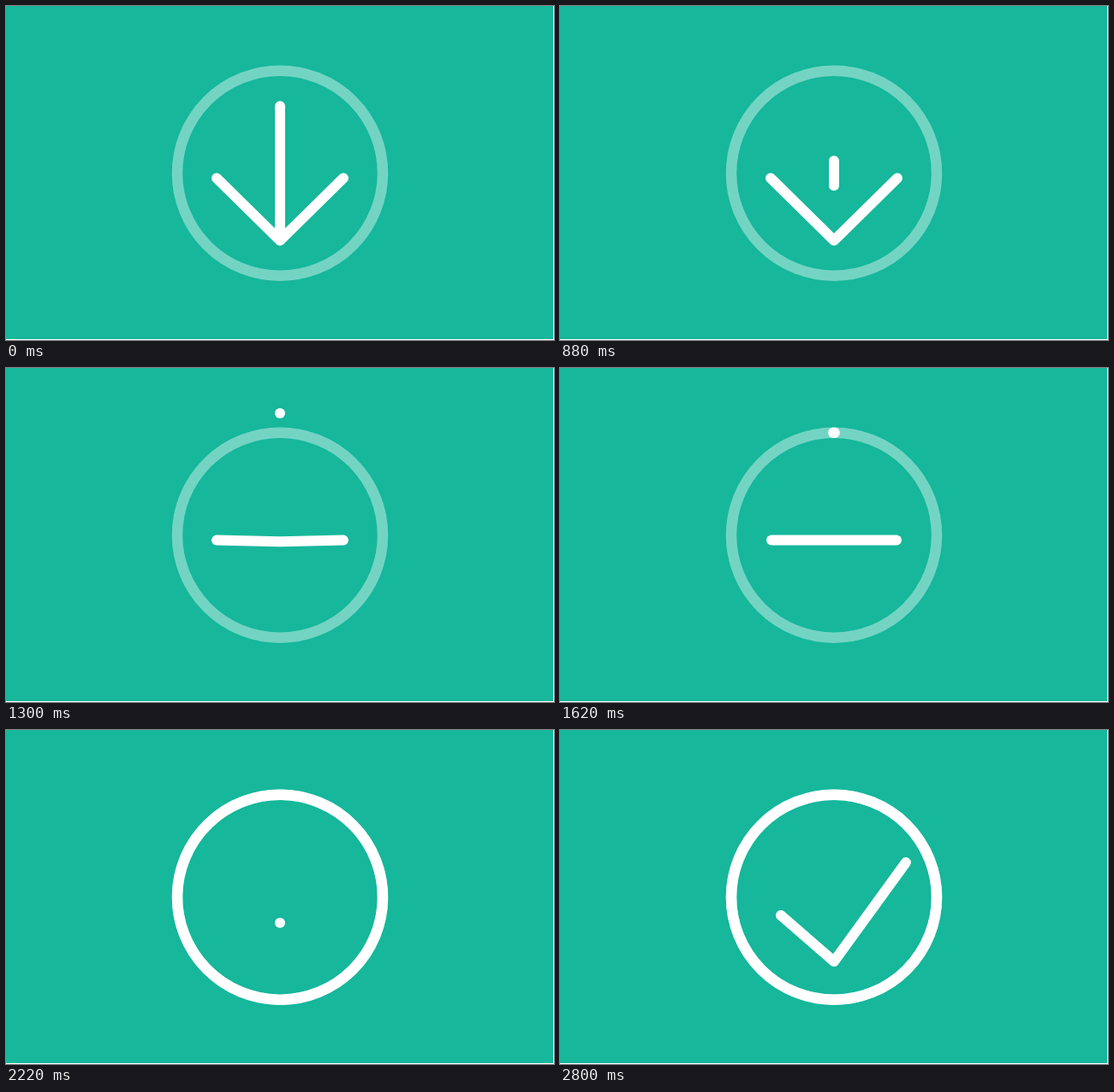
Recreate the animation shown at these times as an HTML page with a canvas. Size 640 by 391 pixels, loop 3.52 s.

```html
<!DOCTYPE html>
<html lang="en">
<head>
<meta charset="utf-8">
<title>Download to check</title>
<style>
  html, body { margin: 0; height: 100%; overflow: hidden; background: #fff; }
  canvas { display: block; }
</style>
</head>
<body>
<canvas id="stage" width="640" height="391"></canvas>
<script>
const ctx = document.getElementById('stage').getContext('2d');
const LOOP = 3520, CX = 320, CY = 195.7, RADIUS = 120, BAR_Y = 201.5;
const TOP = -Math.PI / 2;

const clamp = v => Math.min(1, Math.max(0, v));
const span = (t, start, length) => clamp((t - start) / length);
const sine = p => (1 - Math.cos(Math.PI * p)) / 2;
const mix = (a, b, p) => a + (b - a) * p;

// Damped spring from 0 to 1
function spring(ms, damping) {
  if (ms <= 0) return 0;
  const s = ms / 1000, w = 21;
  return 1 - Math.exp(-damping * s) * (Math.cos(w * s) + damping / w * Math.sin(w * s));
}

function line(...points) {
  ctx.lineWidth = 12;
  ctx.beginPath();
  points.forEach(([x, y]) => ctx.lineTo(x, y));
  ctx.stroke();
}

const dot = y => line([CX - 0.01, y], [CX + 0.01, y]);

function arc(half, color) {
  ctx.strokeStyle = color;
  ctx.lineWidth = 12.5;
  ctx.beginPath();
  ctx.arc(CX, CY, RADIUS, TOP - half, TOP + half);
  ctx.stroke();
}

// The dot is thrown up, peaks above the ring and lands on it
function dotHeight(t) {
  const launch = 1153, rise = 229, peak = 32;
  const u = (Math.min(1500, Math.max(launch, t)) - launch - rise) / rise;
  return peak + (CY - peak) * u * u;
}

function drawArrow(t) {
  const half = Math.max(0.01, 78.5 * (1 - span(t, 487, 482)));
  const y = dotHeight(t);
  line([CX, y - half], [CX, y + half]);
  const apex = t < 1500 ? mix(274.5, BAR_Y, spring(t - 1010, 12.6)) : BAR_Y;
  line([CX - 74, BAR_Y], [CX, apex], [CX + 74, BAR_Y]);
}

function drawBar(t) {
  const half = 74 * (1 - span(t, 1614, 431));
  const fall = span(t, 2070, 254) ** 2;
  if (half > 0.01) line([CX - half, BAR_Y], [CX + half, BAR_Y]);
  else dot(mix(BAR_Y, 271, fall));
}

function drawCheck(t) {
  const grow = damping => t < 2800 ? spring(t - 2324, damping) : 1;
  const lift = grow(11.5);
  line(
    [mix(CX, 258, grow(40)), mix(271, 217, lift)],
    [CX, 271],
    [mix(CX, 404, grow(17.8)), mix(271, 155, lift)]
  );
}

function draw(t) {
  // A one-pixel white edge stays at the right and bottom
  ctx.fillStyle = '#16b79b';
  ctx.fillRect(0, 0, 639, 390);
  ctx.lineCap = ctx.lineJoin = 'round';
  arc(Math.PI, '#74d4c4');
  ctx.strokeStyle = '#fff';
  if (t < 1614) return drawArrow(t);
  arc(Math.max(0.005, Math.PI * sine(span(t, 1614, 635))), '#fff');
  if (t <= 2324) drawBar(t);
  else drawCheck(t);
}

let begin;
function tick(now) {
  begin ??= now;
  draw((now - begin) % LOOP);
  requestAnimationFrame(tick);
}
requestAnimationFrame(tick);
</script>
</body>
</html>
```
